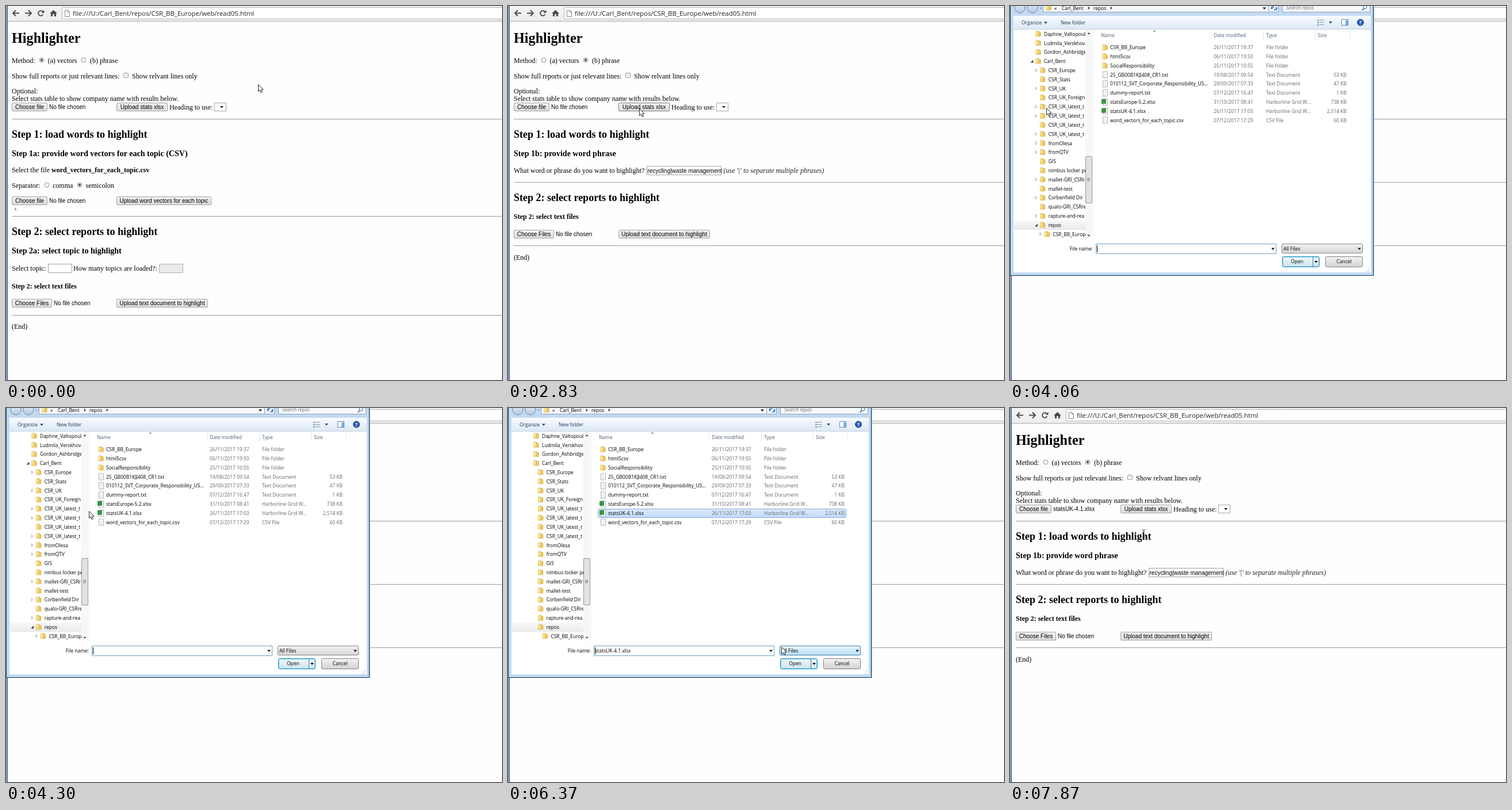
An HTML page with a canvas for the animation above (8 s loop, 862 px wide and 650 px high).

```html
<!DOCTYPE html>
<html lang="en">
<head>
<meta charset="utf-8">
<title>Highlighter</title>
<style>
html, body { margin: 0; width: 862px; height: 650px; overflow: hidden; background: #fff; }
canvas { display: block; }
</style>
</head>
<body>
<canvas id="stage" width="862" height="650"></canvas>
<script>
const g = document.getElementById('stage').getContext('2d');
const LOOP = 8000;
const SERIF = '"Liberation Serif", serif', SANS = '"Liberation Sans", sans-serif';
const UI = '8.45px "Open Sans", sans-serif';
const BODY = '12px ' + SERIF, BOLD = 'bold 12px ' + SERIF, FORM = '10px ' + SANS;
const H1 = 'bold 24.2px ' + SERIF, H2 = 'bold 18px ' + SERIF, H3 = 'bold 14.05px ' + SERIF;

// ---- drawing helpers ----
function text(s, x, y, font = BODY, color = '#000', align = 'left') {
  g.font = font; g.fillStyle = color; g.textAlign = align;
  g.fillText(s, x, y);
}
function rect(x, y, w, h, fill) { g.fillStyle = fill; g.fillRect(x, y, w, h); }
function box(x, y, w, h, fill, border, r = 0) {
  g.beginPath(); g.roundRect(x + .5, y + .5, w - 1, h - 1, r);
  g.fillStyle = fill; g.fill();
  g.strokeStyle = border; g.lineWidth = 1; g.stroke();
}
function shade(y, h, top, bottom) {
  const s = g.createLinearGradient(0, y, 0, y + h);
  s.addColorStop(0, top); s.addColorStop(1, bottom);
  return s;
}
function poly(points, fill, stroke) {
  g.beginPath();
  points.forEach(([x, y]) => g.lineTo(x, y));
  g.closePath();
  if (fill) { g.fillStyle = fill; g.fill(); }
  if (stroke) { g.strokeStyle = stroke; g.lineWidth = 1; g.stroke(); }
}
function line(color, width, ...points) {
  g.beginPath();
  points.forEach(([x, y]) => g.lineTo(x, y));
  g.strokeStyle = color; g.lineWidth = width; g.stroke();
}
function disc(x, y, r, fill, stroke) {
  g.beginPath(); g.arc(x, y, r, 0, 7);
  if (fill) { g.fillStyle = fill; g.fill(); }
  if (stroke) { g.strokeStyle = stroke; g.lineWidth = 1; g.stroke(); }
}
const down = (x, y, s = 3, c = '#111') => poly([[x - s, y - s / 2], [x + s, y - s / 2], [x, y + s / 2 + .5]], c);
const right = (x, y, s = 2.5, c = '#222') => poly([[x - s / 2, y - s], [x + s / 2 + .5, y], [x - s / 2, y + s]], c);
const inside = (p, x, y, w, h) => p.x >= x && p.x < x + w && p.y >= y && p.y < y + h;

// ---- web page ----
function toolbar() {
  rect(3, 0, 859, 26, shade(0, 26, '#f4f4f4', '#ededed'));
  rect(3, 26, 859, 1, '#a9a9a9');
  box(97, 2, 780, 21, '#fff', '#b4b4b4', 2);
  const ink = '#4a4a4a';
  for (const [x, d] of [[17, 1], [39, -1]]) {
    line(ink, 2, [x + 6 * d, 12.5], [x - 4 * d, 12.5]);
    line(ink, 2, [x, 7.5], [x - 5 * d, 12.5], [x, 17.5]);
  }
  g.beginPath(); g.arc(60.5, 12.5, 4.3, .5, 5.6);
  g.strokeStyle = ink; g.lineWidth = 2; g.stroke();
  poly([[66.5, 7], [66.5, 12], [61.5, 12]], ink);
  poly([[82.5, 7], [89, 13], [87, 13], [87, 18], [84, 18], [84, 14], [81, 14], [81, 18], [78, 18], [78, 13], [76, 13]], ink);
  poly([[102.5, 7.5], [107.5, 7.5], [110.5, 10.5], [110.5, 18.5], [102.5, 18.5]], '#fff', '#888');
  line('#888', 1, [107.5, 7.5], [107.5, 10.5], [110.5, 10.5]);
  text('file:///U:/Carl_Bent/repos/CSR_BB_Europe/web/read05.html', 116, 17, '11.4px "Open Sans", sans-serif', '#222');
}
function button(label, x, y, w, p) {
  const hot = inside(p, x, y, w, 16);
  box(x, y, w, 15, shade(y, 15, hot ? '#f8f8f8' : '#f4f4f4', hot ? '#dcdcdc' : '#dadada'), hot ? '#777' : '#a3a3a3', 1.5);
  text(label, x + w / 2, y + 11.3, FORM, '#000', 'center');
}
function radio(x, y, on) {
  disc(x, y, 4, shade(y - 4, 8, '#eee', '#fff'), '#979797');
  if (on) disc(x, y, 2.2, '#555');
}
const rule = y => { rect(10, y, 852, 1, '#a2a2a2'); rect(10, y + 1, 852, 1, '#f4f4f4'); };

function textFiles(y, p) {
  const top = Math.floor(y + 19);
  text('Step 2: select text files', 10, y, BOLD);
  button('Choose Files', 10, top, 70, p);
  text('No file chosen', 83, top + 11.3, FORM);
  button('Upload text document to highlight', 192, top, 159, p);
  rule(Math.floor(y + 46.5));
  text('(End)', 10, y + 70.5);
}
function page(phrase, file, p) {
  rect(0, 0, 862, 650, '#fefefe');
  rect(0, 0, 1, 650, '#b9c4da');
  rect(1, 0, 2, 650, '#566a9c');
  toolbar();
  text('Highlighter', 10, 64, H1);
  text('Method:', 10, 99);
  radio(62, 94, !phrase); text('(a) vectors', 72.5, 99);
  radio(135, 94, phrase); text('(b) phrase', 146, 99);
  text('Show full reports or just relevant lines:', 10, 126);
  box(204, 116, 9, 9, shade(116, 9, '#e6e6e6', '#fafafa'), '#979797', 1);
  text('Show relvant lines only', 219, 126);
  text('Optional:', 10, 151.5);
  text('Select stats table to show company name with results below.', 10, 165);
  button('Choose file', 10, 168, 62, p);
  text(file, 75, 179.3, FORM);
  button('Upload stats xlsx', 192, 168, 89, p);
  text('Heading to use:', 284, 179.5);
  box(362, 168, 21, 15, '#fff', '#a5a5a5');
  down(375, 175.5, 2.8);
  rule(196);
  text('Step 1: load words to highlight', 10, 228.5, H2);
  if (phrase) {
    text('Step 1b: provide word phrase', 10, 261, H3);
    text('What word or phrase do you want to highlight?', 10, 289.5);
    box(241, 278, 130, 16, '#fff', '#a0a0a0');
    text('recycling|waste management', 242.5, 289.5, FORM);
    text("(use '|' to separate multiple phrases)", 374.5, 289.5, 'italic ' + BODY, '#222');
    rule(306);
    text('Step 2: select reports to highlight', 10, 338.5, H2);
    textFiles(370, p);
    return;
  }
  text('Step 1a: provide word vectors for each topic (CSV)', 10, 261, H3);
  text('Select the file ', 10, 289);
  text('word_vectors_for_each_topic.csv', 79, 289, BOLD);
  text('Separator:', 10, 316);
  radio(71, 311, false); text('comma', 81, 316);
  radio(128, 311, true); text('semicolon', 138.5, 316);
  button('Choose file', 10, 331, 62, p);
  text('No file chosen', 75, 342.3, FORM);
  button('Upload word vectors for each topic', 192, 331, 165, p);
  poly([[17.5, 350], [14, 353], [17.5, 356]], '#999');
  rule(365);
  text('Step 2: select reports to highlight', 10, 398, H2);
  text('Step 2a: select topic to highlight', 10, 430, H3);
  text('Select topic:', 10, 460);
  box(73, 448, 42, 16, '#fff', '#a0a0a0');
  text('How many topics are loaded?:', 117, 460);
  box(266, 448, 42, 16, '#ebebeb', '#b0b0b0');
  textFiles(490.5, p);
}

// ---- file dialog ----
// First character: + closed, - open, . leaf; second: indent level.
const TREE = ['.0Daphne_Valtopoulos', '.0Ludmila_Verskhova', '.0Gordon_Ashbridge', '-0Carl_Bent',
  '+1CSR_Europe', '.1CSR_Stats', '+1CSR_UK', '.1CSR_UK_Foreign', '+1CSR_UK_latest_t', '+1CSR_UK_latest_t',
  '.1CSR_UK_latest_t', '+1CSR_UK_latest_t', '+1fromOlesa', '+1fromQTV', '.1GIS', '.1nimbus locker pri',
  '+1mallet-GRI_CSRr', '.1mallet-test', '+1Corbenfield Dir', '.1qualo-GRI_CSRre', '+1rapture-and-rea',
  '-1repos', '+2CSR_BB_Europe'];
const SHEET = 'Harborline Grid W...';
const FILES = [
  ['CSR_BB_Europe', '26/11/2017 19:37', 'File folder', ''],
  ['html5csv', '06/11/2017 19:50', 'File folder', ''],
  ['SocialResponsibility', '25/11/2017 10:55', 'File folder', ''],
  ['25_GB00B1KJJ408_CR1.txt', '19/08/2017 09:54', 'Text Document', '53 KB'],
  ['010112_SVT_Corporate_Responsibility_US...', '29/09/2017 07:33', 'Text Document', '47 KB'],
  ['dummy-report.txt', '07/12/2017 16:47', 'Text Document', '1 KB'],
  ['statsEurope-5.2.xlsx', '31/10/2017 08:41', SHEET, '738 KB'],
  ['statsUK-4.1.xlsx', '26/11/2017 17:03', SHEET, '2,514 KB'],
  ['word_vectors_for_each_topic.csv', '07/12/2017 17:29', 'CSV File', '60 KB']];
const PITCH = 15.82, PICK = 7;

function folder(x, y) {
  poly([[x + .5, y - 5], [x + 5, y - 5], [x + 9.5, y - 3], [x + 9.5, y + 4.5], [x + .5, y + 4.5]], '#dcb247');
  poly([[x + 1, y - 4.5], [x + 5, y - 3.5], [x + 5, y + 5.5], [x + 1, y + 4]], shade(y - 5, 10, '#fdf0b0', '#f2d374'));
  rect(x + 6, y - 3, 2, 7, '#f0d070');
}
function fileIcon(x, y, type) {
  if (type === 'File folder') return folder(x, y);
  box(x + 1, y - 6, 9, 12, '#fff', '#a8adb5');
  if (type === SHEET) rect(x - 1, y - 5, 8, 8, '#3c9447');
  else for (let i = -3; i < 4; i += 2) rect(x + 3, y + i, 5, 1, '#dde1e7');
}
function tree(arrows) {
  g.save();
  g.beginPath(); g.rect(6, 41, 125, 362); g.clip();
  rect(7, 373, 124, 16, shade(373, 16, '#f8f8f8', '#e9e9e9'));
  TREE.forEach((item, i) => {
    const y = 48.5 + i * PITCH, x = 44 + 7.7 * item[1];
    g.globalAlpha = arrows;
    if (item[0] === '+') poly([[x - 7.5, y - 2.5], [x - 4.5, y], [x - 7.5, y + 2.5]], '#fff', '#b0b0b0');
    if (item[0] === '-') poly([[x - 3.5, y - 2.5], [x - 3.5, y + 2.5], [x - 8.5, y + 2.5]], '#444');
    g.globalAlpha = 1;
    folder(x, y);
    text(item.slice(2), x + 15, y + 3.2, UI);
  });
  g.restore();
  rect(131, 41, 12, 363, '#f7f7f7');
  box(131, 261, 12, 82, '#e2e2e2', '#989898', 1.5);
  for (const y of [299, 301, 303]) rect(134, y, 5, 1, '#777');
  poly([[134.5, 49], [139.5, 49], [137, 46]], '#444');
  down(137, 399, 2.5, '#444');
  rect(144, 41, 1, 363, '#f1f4f8');
}
function list(picked, active, hover) {
  for (const x of [349, 440, 530, 590]) rect(x, 42, 1, 16, '#e3e8ee');
  [['Name', 158], ['Date modified', 354], ['Type', 445], ['Size', 535]]
    .forEach(([s, x]) => text(s, x, 53.5, UI, '#4c607a'));
  poly([[248.5, 44.5], [253.5, 44.5], [251, 42]], '#5c7f9f');
  FILES.forEach(([name, date, type, size], i) => {
    const y = 72 + i * PITCH, top = Math.round(y - 8);
    if (i === PICK && picked)
      active ? box(156, top, 432, 16, shade(top, 16, '#dcebfd', '#c1dbfc'), '#84acdd', 2)
             : box(156, top, 432, 16, shade(top, 16, '#f9f9f9', '#e6e6e6'), '#dcdcdc', 2);
    else if (i === hover)
      box(156, top, 432, 16, shade(top, 16, '#fafcfe', '#ebf4fe'), '#b8d6fb', 2);
    fileIcon(160, y, type);
    text(name, 174, y + 3.2, UI);
    text(date, 354, y + 3.2, UI, '#666');
    text(type, 445, y + 3.2, UI, '#666');
    text(size, 585, y + 3.2, UI, '#666', 'right');
  });
}
function dialogTop() {
  for (const x of [17, 39]) disc(x, 3, 9, shade(-6, 18, '#e6eef8', '#b4c8de'), '#7288a5');
  down(53.5, 4, 2, '#8797ab');
  box(57, -8, 393, 19, '#f5f9fd', '#8ba2bd');
  box(449, -8, 18, 19, '#edf4fb', '#8ba2bd');
  box(473, -8, 153, 19, '#f7fafd', '#8ba2bd');
  folder(62, 3);
  text('«', 77, 6.5, UI);
  text('Carl_Bent', 90, 6.5, UI);
  right(137, 3.5);
  text('repos', 145, 6.5, UI);
  right(176, 3.5);
  down(442, 4, 3);
  line('#2c66b8', 1.4, [455, 4], [455, 1.5], [459, 1.5]);
  line('#2c66b8', 1.4, [459, 6.5], [463, 6.5], [463, 3.5]);
  poly([[453, 3], [457, 3], [455, 6]], '#2c66b8');
  poly([[461, 4.5], [465, 4.5], [463, 1.5]], '#2c66b8');
  text('Search repos', 480, 6, 'italic ' + UI, '#707070');
  disc(617, 2, 3, null, '#2f62a3');
  line('#2f62a3', 1.5, [615, 4.2], [611.5, 8]);

  rect(6, 17, 621, 24, shade(17, 24, '#f8fbfe', '#dce7f4'));
  rect(6, 40, 621, 1, '#c5d3e4');
  text('Organize', 20, 31.5, UI, '#1e395b'); down(62, 29, 2.8, '#1e395b');
  text('New folder', 88, 31.5, UI, '#1e395b');
  for (const y of [24, 28, 32]) { rect(534, y, 3, 2, '#7d92b0'); rect(538, y, 8, 1, '#7d92b0'); }
  down(557, 28.5, 2.8, '#1e395b');
  box(576, 23, 12, 11, '#fff', '#5c83b5'); rect(583, 25, 4, 8, '#72b3e0');
  disc(609, 28.5, 5.5, '#2c5fb3', '#183d80');
  text('?', 609, 31.8, 'bold ' + UI, '#fff', 'center');
}
function dialog(t, p) {
  const picked = t >= 4960, opened = t >= 6900;
  rect(0, 0, 633, 469, '#b9c6d3');
  rect(0, 0, 632, 469, '#2b3d55');
  rect(1, 0, 630, 468, '#8fd0ee');
  rect(2, 0, 628, 467, '#c3daf2');
  rect(6, 17, 621, 446, '#fff');
  dialogTop();
  tree(1 - Math.min(1, Math.max(0, (t - 4450) / 520)));
  const overList = inside(p, 156, 64, 432, 142);
  list(picked, !opened, overList ? Math.floor((p.y + 2 - 64) / PITCH) : -1);

  text('File name:', 144, 425, UI, '#000', 'right');
  box(149, 413, 314, 18, '#fff', opened ? '#edf0f3' : '#69a3cb');
  if (picked) text('statsUK-4.1.xlsx', 151.5, 425, UI);
  if (!opened) rect(151, 416, 1, 12, '#000');
  down(457, 422, 3);
  const overType = inside(p, 472, 413, 141, 18), overOpen = inside(p, 473, 435, 65, 19);
  box(472, 413, 141, 17, overType ? shade(413, 17, '#eaf6fd', '#b5dff6') : shade(413, 17, '#f1f1f1', '#d5d5d5'),
    overType ? '#3c7fb1' : '#8a8a8a', 1.5);
  text('All Files', 475, 425, UI);
  down(607, 422, 3);
  box(473, 435, 65, 19, overOpen ? shade(435, 19, '#d4eefb', '#7fc0e8') : shade(435, 19, '#f0f7fa', '#cfe3ec'), '#3792b8', 2);
  if (!overOpen) box(474, 436, 63, 17, 'transparent', '#74d4f2', 1.5);
  rect(526, 436, 1, 17, '#3c7fb1');
  text('Open', 499, 447.3, UI, '#000', 'center');
  down(532, 444.5, 3);
  box(548, 435, 65, 19, shade(435, 19, '#f3f3f3', '#d2d2d2'), '#838383', 2);
  text('Cancel', 580.5, 447.3, UI, '#000', 'center');
  for (let i = 0; i < 3; i++)
    for (let j = 0; j <= i; j++) rect(623 - 2.5 * j, 456 + 2.5 * i, 1.3, 1.3, '#b5bcc4');
}

// ---- pointer ----
function arrow({ x, y }) {
  g.save();
  g.translate(x + .5, y + .5);
  poly([[0, 0], [0, 12], [2.8, 9.5], [4.7, 14], [6.8, 13.1], [4.9, 8.8], [8.6, 8.6]], '#fff', '#222');
  g.restore();
}
function beam({ x, y }) {
  line('#333', 1, [x - 2.5, y - 5.5], [x + .5, y - 4.5], [x + 3.5, y - 5.5]);
  line('#333', 1, [x - 2.5, y + 7.5], [x + .5, y + 6.5], [x + 3.5, y + 7.5]);
  line('#333', 1, [x + .5, y - 4.5], [x + .5, y + 6.5]);
}
const PATH = [[515, 438, 136], [930, 290, 92], [1200, 185, 77], [1600, 130, 90], [2300, 130, 91],
  [2830, 228, 178], [3330, 74, 177], [3480, 66, 177], [3760, 63, 177], [4060, 63, 177], [4300, 144, 179],
  [4450, 144, 179], [5100, 239, 178], [5530, 239, 178], [6500, 490, 430], [6760, 503, 442],
  [7230, 503, 442], [7750, 248, 300], [7870, 232, 217]];
function pointerAt(t) {
  const i = PATH.findIndex(k => k[0] > t);
  if (i < 1) { const [, x, y] = PATH[i < 0 ? PATH.length - 1 : 0]; return { x, y }; }
  const [t0, x0, y0] = PATH[i - 1], [t1, x1, y1] = PATH[i];
  const u = (t - t0) / (t1 - t0), e = u * u * (3 - 2 * u);
  return { x: Math.round(x0 + (x1 - x0) * e), y: Math.round(y0 + (y1 - y0) * e) };
}

const TICKS = [0];
for (const [from, to, n] of [[650, 1600, 7], [1720, 1870, 1], [2430, 2830, 3], [2830, 3330, 4],
  [3480, 3910, 3], [3910, 4060, 1], [4060, 4300, 2], [4300, 4450, 1], [4570, 5230, 5], [5230, 5530, 2],
  [5650, 6640, 7], [6760, 7210, 3], [7210, 7360, 1], [7360, 7750, 3], [7870, 7870, 1]])
  for (let i = 0; i <= n; i++) TICKS.push(Math.round(from + (to - from) * i / n));

function draw(now) {
  const time = now % LOOP;
  const t = TICKS.findLast(k => k <= time);
  const p = pointerAt(t);
  page(t >= 1720, t >= 7360 ? 'statsUK-4.1.xlsx' : 'No file chosen', p);
  if (t >= 4060 && t < 7360) dialog(t, p);
  t >= 7870 ? beam(p) : arrow(p);
}
const start = performance.now();
function loop() {
  draw(performance.now() - start);
  requestAnimationFrame(loop);
}
loop();
</script>
</body>
</html>
```
